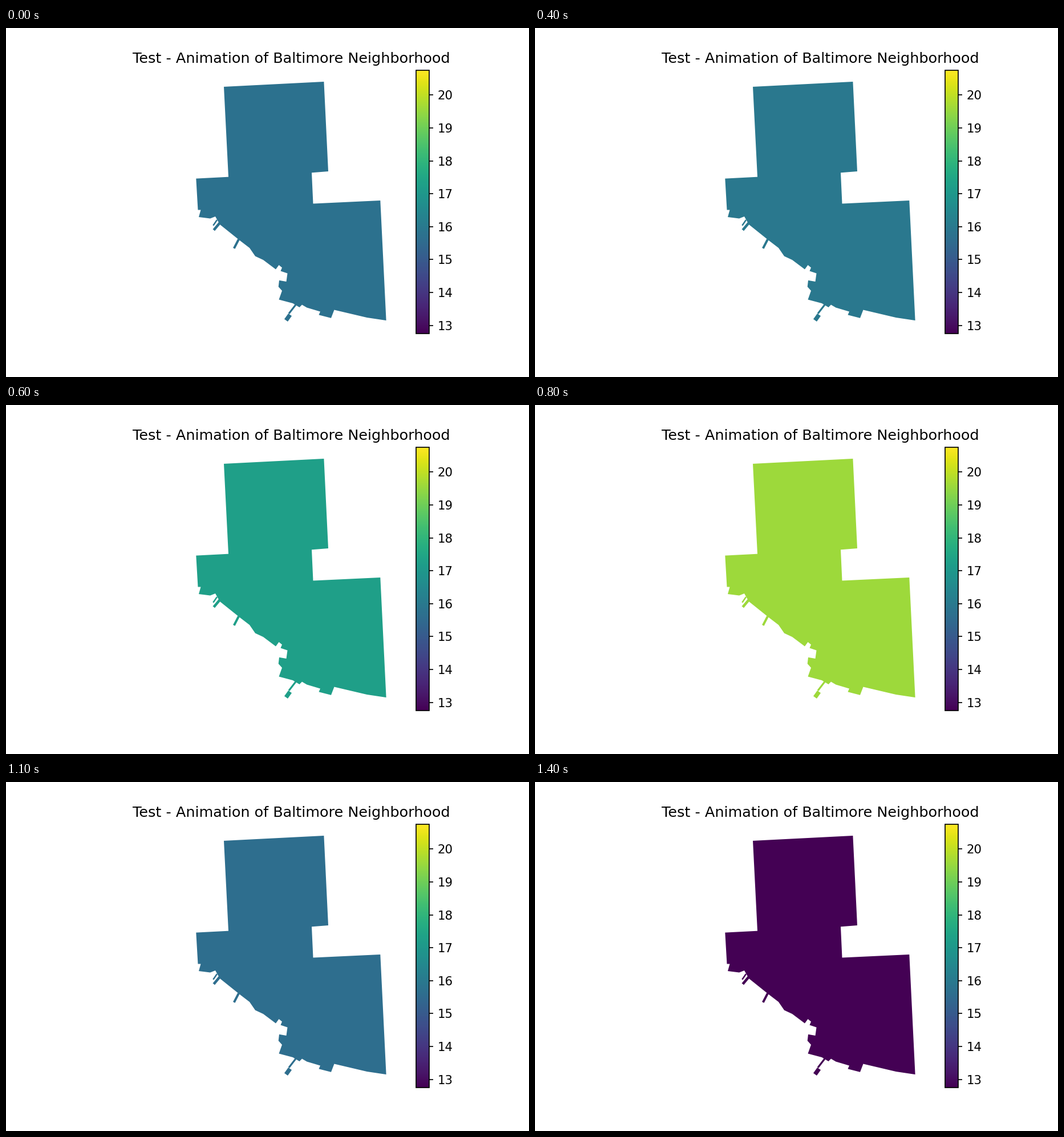
A matplotlib script for the animation above (1.5 s loop, 917 px wide and 611 px high).

```python
import matplotlib.pyplot as plt
import numpy as np
from matplotlib.animation import FuncAnimation
from matplotlib.cm import ScalarMappable
from matplotlib.colors import Normalize
from matplotlib.patches import Polygon

W, H = 917, 611
DPI = W / 6
STEPS, INTERVAL = 15, 100
TOP, BOTTOM = 73.6, 534.6

plt.rcParams["font.family"] = "DejaVu Sans"

# Corners of the neighborhood, clockwise, in pixels from the top left
INLAND = [
    (333.3, 263.6), (390, 260.7), (382, 102.9), (557.4, 94), (565, 251),
    (536, 253.3), (538.5, 307.5), (656.3, 302), (666.6, 512),
]
SHORE = [
    (633, 507), (575.5, 493.5), (570, 507.8), (548.5, 502.3), (551, 496.5),
    (527.5, 489.5), (519, 484.5), (514.5, 489), (503, 482), (478.5, 475.5),
    (484, 460), (477.7, 453), (479, 441.8), (491.5, 444), (493.5, 429.5),
    (481.5, 425.5), (484, 419.5), (478.5, 415), (473, 422.5), (451, 406),
    (437, 399.5), (427, 385), (410, 372), (375, 344), (367, 330),
    (358, 333.5), (338, 331), (341.5, 318.5), (336.5, 318.5),
]


def pier(start, end, width):
    """Corners of a straight pier around its center line."""
    start, end = np.array(start), np.array(end)
    dx, dy = end - start
    side = np.array([-dy, dx]) / np.hypot(dx, dy) * width / 2
    return [start + side, end + side, end - side, start - side]


shapes = [
    INLAND + SHORE,
    pier((508, 484.5), (496, 500), 3.2),
    pier((498, 502), (491, 511.8), 7.4),
    pier((408, 370), (399.8, 385.8), 4),
    pier((375, 341), (364.3, 353.8), 4.6),
    pier((370, 336), (363.3, 345.8), 2.5),
]

# The rate runs straight between its turning points
KEY_STEPS = [0, 2, 4, 6, 9, 11, 14]
KEY_RATES = [15.74, 15.04, 15.96, 17.24, 20.762, 15.63, 12.757]
rates = np.interp(np.arange(STEPS), KEY_STEPS, KEY_RATES)
scale = ScalarMappable(Normalize(rates.min(), rates.max()), "viridis")

# A hair of slack keeps the canvas from being truncated by a pixel
fig = plt.figure(figsize=((W + 0.001) / DPI, (H + 0.001) / DPI), dpi=DPI,
                 facecolor="white")


def pixel_axes(left, right):
    return fig.add_axes([left / W, 1 - BOTTOM / H,
                         (right - left) / W, (BOTTOM - TOP) / H])


ax = pixel_axes(300, 700)
ax.set(xlim=(300, 700), ylim=(BOTTOM, TOP))
ax.axis("off")
ax.set_title("Test - Animation of Baltimore Neighborhood", fontsize=12)
areas = [ax.add_patch(Polygon(s, closed=True, lw=0)) for s in shapes]

fig.colorbar(scale, cax=pixel_axes(719, 742.1))


def draw(step):
    for area in areas:
        area.set_facecolor(scale.to_rgba(rates[step]))
    return areas


anim = FuncAnimation(fig, draw, frames=STEPS, interval=INTERVAL,
                     repeat=True, repeat_delay=0)
plt.show()
```
